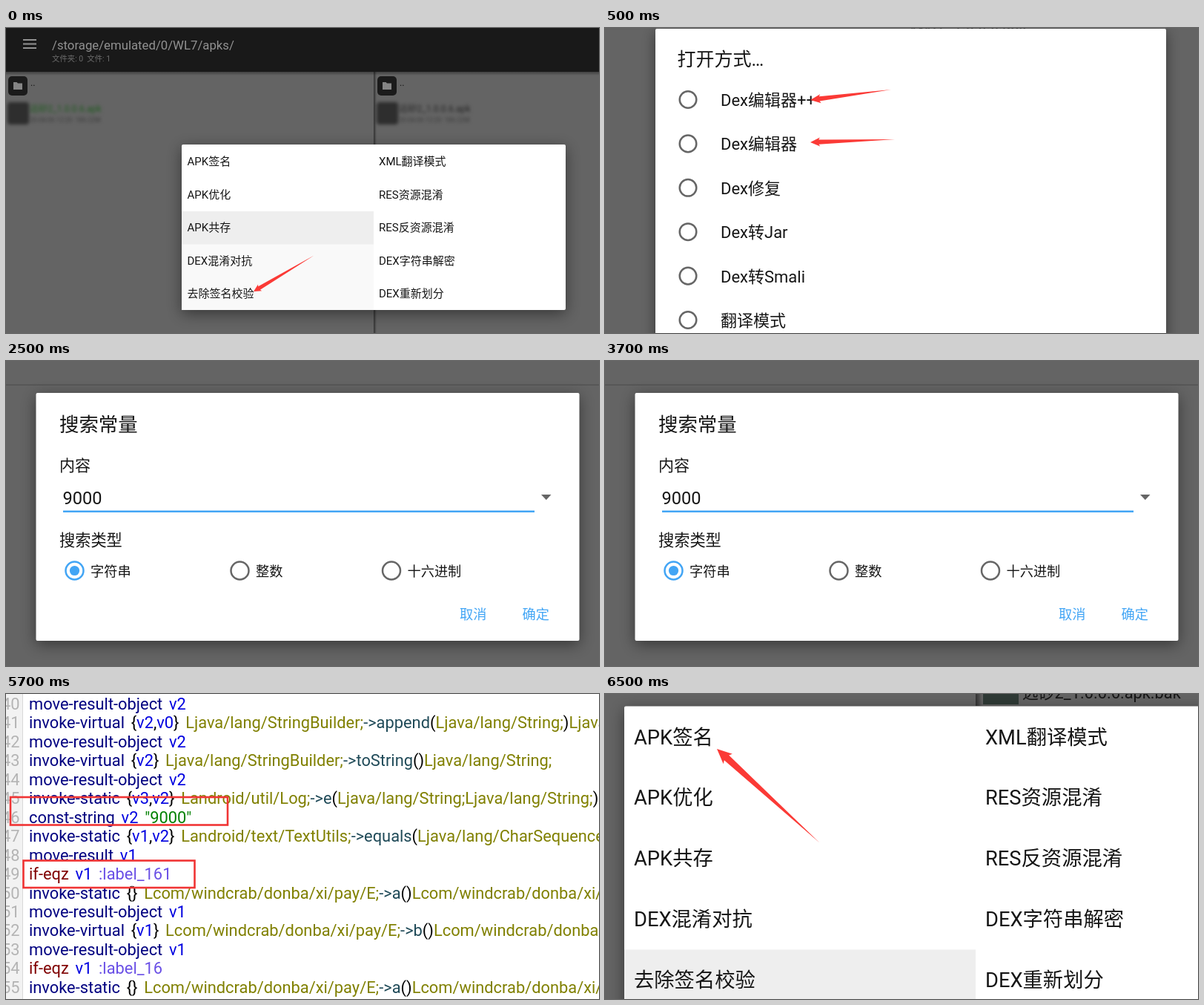
Recreate the animation shown at these times as an HTML page. Size 800 px wide and 411 px high, loop 8 s.

```html
<!DOCTYPE html>
<html lang="zh-CN">
<head>
<meta charset="utf-8">
<title>APK tutorial</title>
<style>
  html, body { margin: 0; width: 100%; height: 100%; overflow: hidden; background: #666; }
  svg { display: block; width: 100%; height: 100%; }
  text {
    font-family: Roboto, "Noto Sans CJK SC", "Noto Sans CJK", sans-serif;
    white-space: pre;
  }
  .code text { word-spacing: 3.3px; }
  .blur { filter: blur(2px); }
</style>
</head>
<body>
<svg id="stage" viewBox="0 0 800 411" xmlns="http://www.w3.org/2000/svg"></svg>
<script>
const INK = '#161616', RED = '#fb3a36', BLUE = '#42a5f5', DIM = '#646464', GREY = '#666';

// Drawing helpers
const rect = (x, y, w, h, fill, more = '') =>
  `<rect x="${x}" y="${y}" width="${w}" height="${h}" fill="${fill}" ${more}/>`;
const text = (x, y, size, str, fill = INK, more = '') =>
  `<text x="${x}" y="${y}" font-size="${size}" fill="${fill}" ${more}>${str}</text>`;
const card = (x, y, w, h, blur) =>
  rect(x, y + blur / 2, w, h, '#000', `opacity=".45" style="filter:blur(${blur}px)"`) +
  rect(x, y, w, h, '#fff', 'rx="2"');

// Tapered arrow: sharp tail, barbed head of the given length and half width
function arrow(x, y, tx, ty, head, half) {
  const len = Math.hypot(tx - x, ty - y);
  const angle = Math.atan2(ty - y, tx - x) * 180 / Math.PI;
  const neck = head * 0.88, body = half * 0.52;
  return `<path fill="${RED}" transform="translate(${x} ${y}) rotate(${angle})"
    d="M0 0L${head} ${-half}L${neck} ${-body}L${len} 0L${neck} ${body}L${head} ${half}Z"/>`;
}

function radio(x, y, r, on) {
  const color = on ? BLUE : GREY;
  return `<circle cx="${x}" cy="${y}" r="${r}" fill="none" stroke="${color}" stroke-width="2.5"/>` +
    (on ? `<circle cx="${x}" cy="${y}" r="${r * 0.55}" fill="${color}"/>` : '');
}

const TOOLS = [
  ['APK签名', 'XML翻译模式'],
  ['APK优化', 'RES资源混淆'],
  ['APK共存', 'RES反资源混淆'],
  ['DEX混淆对抗', 'DEX字符串解密'],
  ['去除签名校验', 'DEX重新划分']
];
const tools = (x1, x2, y, step, size) => TOOLS.map(([a, b], i) =>
  text(x1, y + i * step, size, a) + text(x2, y + i * step, size, b)).join('');

const defs = `<defs>
  <linearGradient id="down" x2="0" y2="1">
    <stop stop-color="#000" stop-opacity=".35"/><stop offset="1" stop-color="#000" stop-opacity="0"/>
  </linearGradient>
  <linearGradient id="right">
    <stop stop-color="#000" stop-opacity=".5"/><stop offset="1" stop-color="#000" stop-opacity="0"/>
  </linearGradient>
</defs>`;

function pane(x, nameColor) {
  return `<g transform="translate(${x} 0)">` +
    rect(3, 65, 26, 26, '#1b1b1b', 'rx="5"') +
    '<path fill="#858585" d="M10 73h4.5l1.5 1.5h6v8.5h-12z"/>' +
    text(33, 77.5, 12.5, '..', '#111') +
    '<g class="blur">' + rect(2, 100, 29, 30, '#2e2e2e', 'rx="4"') +
    text(32, 113, 12.2, '远砂2_1.0.0.6.apk', nameColor) +
    text(32, 127, 8.6, '20-04-06 12:20  186.22M', '#3c3c3c') + '</g></g>';
}

function fileMenu() {
  const bars = [15, 20.5, 26].map(y => rect(23, y, 18, 2, '#929292')).join('');
  return rect(0, 0, 800, 411, DIM) +
    pane(0, '#1f5a1f') + pane(498, '#262626') +
    rect(496, 59, 4, 352, 'url(#right)') +
    rect(0, 59, 800, 5, 'url(#down)') +
    rect(0, 0, 800, 59, '#191919') + bars +
    text(62, 29, 16.75, '/storage/emulated/0/WL7/apks/', '#929292') +
    text(62, 45, 10.4, '文件夹: 0  文件: 1', '#6c6c6c') +
    card(237, 157, 518, 223, 10) +
    rect(237, 247, 259, 133, '#f9f9f9') + rect(237, 247, 259, 44.5, '#eee') +
    tools(244.5, 503, 185, 44.6, 15) +
    arrow(334, 355, 415.5, 306.5, 10, 5);
}

function openWith() {
  const items = ['Dex编辑器++', 'Dex编辑器', 'Dex修复', 'Dex转Jar', 'Dex转Smali', '翻译模式'];
  return rect(0, 0, 800, 411, DIM) +
    text(410, 3, 20, '远砂2_1.0.0.6.apk', '#333') +
    card(68, 1, 689, 430, 9) +
    text(97.5, 50.5, 25, '打开方式…') +
    items.map((s, i) => {
      const y = 96.5 + i * 59.4;
      return radio(112, y, 11.3) + text(156, y + 8.5, 22, s);
    }).join('') +
    arrow(277, 97, 386, 83, 14, 6) +
    arrow(277, 154, 391, 150, 13, 6);
}

function searchBox() {
  const kinds = [[92.5, '字符串'], [315.5, '整数'], [520, '十六进制']];
  return rect(0, 0, 800, 411, DIM) + rect(0, 31.5, 800, 1.5, '#535353') +
    card(40.5, 43, 733, 334, 10) +
    text(72, 94.5, 26.4, '搜索常量') +
    text(72, 148, 21, '内容') +
    text(76.5, 192.5, 23.6, '9000') +
    rect(77, 201.5, 636, 2.5, BLUE) +
    '<path fill="#666" d="M722 180h13.5l-6.7 7.2z"/>' +
    text(72, 248.5, 21.2, '搜索类型') +
    kinds.map(([x, s], i) => radio(x, 282.5, 12, i === 0) + text(x + 21.5, 289.5, 18.2, s)).join('') +
    text(612, 347.5, 18.2, '取消', BLUE) + text(696.5, 347.5, 18.2, '确定', BLUE);
}

const PKG = 'Lcom/windcrab/donba/xi/pay/E;';
const STR = 'Ljava/lang/String;', BUILD = 'Ljava/lang/StringBuilder;';
const CODE = [
  'move-result-object v2',
  `invoke-virtual {v2,v0} ${BUILD}->append(${STR})${BUILD}`,
  'move-result-object v2',
  `invoke-virtual {v2} ${BUILD}->toString()${STR}`,
  'move-result-object v2',
  `invoke-static {v3,v2} Landroid/util/Log;->e(${STR}${STR})I`,
  'const-string v2 "9000"',
  'invoke-static {v1,v2} Landroid/text/TextUtils;->equals(Ljava/lang/CharSequence;',
  'move-result v1',
  'if-eqz v1 :label_161',
  `invoke-static {} ${PKG}->a()${PKG}`,
  'move-result-object v1',
  `invoke-virtual {v1} ${PKG}->b()${PKG}`,
  'move-result-object v1',
  'if-eqz v1 :label_16',
  `invoke-static {} ${PKG}->a()${PKG}`
];

// The first rule that fits the start of the remaining line colours its match
const RULES = [
  [/^v\d/, '#0000e0'],
  [/^if-\w+/, '#800000'],
  [/^[a-z-]+(?!>)/, '#000080'],
  [/^->\w+/, '#1f4a58'],
  [/^"\w*"/, '#008000'],
  [/^:\w+/, '#6a50e6'],
  [/^L[\w/]+;/, '#808000'],
  [/^./, '#000']
];

function highlight(line) {
  let out = '';
  while (line) {
    const [re, color] = RULES.find(([re]) => re.test(line));
    const tok = line.match(re)[0];
    out += `<tspan fill="${color}">${tok.replace('>', '&gt;')}</tspan>`;
    line = line.slice(tok.length);
  }
  return out;
}

function smali() {
  const frame = (x, y, w, h) => rect(x, y, w, h, 'none', 'stroke="#f03434" stroke-width="2.6"');
  return rect(0, 0, 800, 411, '#fff') + rect(0, 0, 22, 411, '#f2f2f2') + rect(22, 0, 1, 411, '#d8d8d8') +
    '<g class="code">' + CODE.map((line, i) => {
      const y = 21 + i * 25.45;
      return text(18.5, y, 21.85, 40 + i, '#b4b4b4', 'text-anchor="end"') +
        text(31, y, 21.85, highlight(line));
    }).join('') + '</g>' +
    frame(6, 139, 293, 37.5) + frame(23.5, 224.5, 231, 36.5);
}

function signMenu() {
  return rect(0, 0, 800, 411, DIM) +
    rect(500, 0, 9, 16, 'url(#right)') +
    rect(510, -34, 48, 48, '#2f3a36') +
    text(563, 6, 21.8, '远砂2_1.0.0.6.apk.bak') +
    card(26, 16.5, 830, 460, 10) +
    rect(26, 344.5, 474, 67, '#eee') +
    tools(39, 513, 67.5, 81.9, 27.3) +
    arrow(151, 74, 289.5, 200.5, 20, 9);
}

// Each scene with the time it begins, in ms
const LOOP = 8000;
const SCENES = [[0, fileMenu], [500, openWith], [2500, searchBox], [4500, smali], [6500, signMenu]];

const stage = document.getElementById('stage');
stage.innerHTML = defs + SCENES.map(([, draw]) => `<g class="scene">${draw()}</g>`).join('');
const groups = [...stage.querySelectorAll('.scene')];

function tick() {
  const t = performance.now() % LOOP;
  const now = SCENES.filter(([start]) => start <= t).length - 1;
  groups.forEach((g, i) => { g.style.display = i === now ? '' : 'none'; });
  requestAnimationFrame(tick);
}
tick();
</script>
</body>
</html>
```
